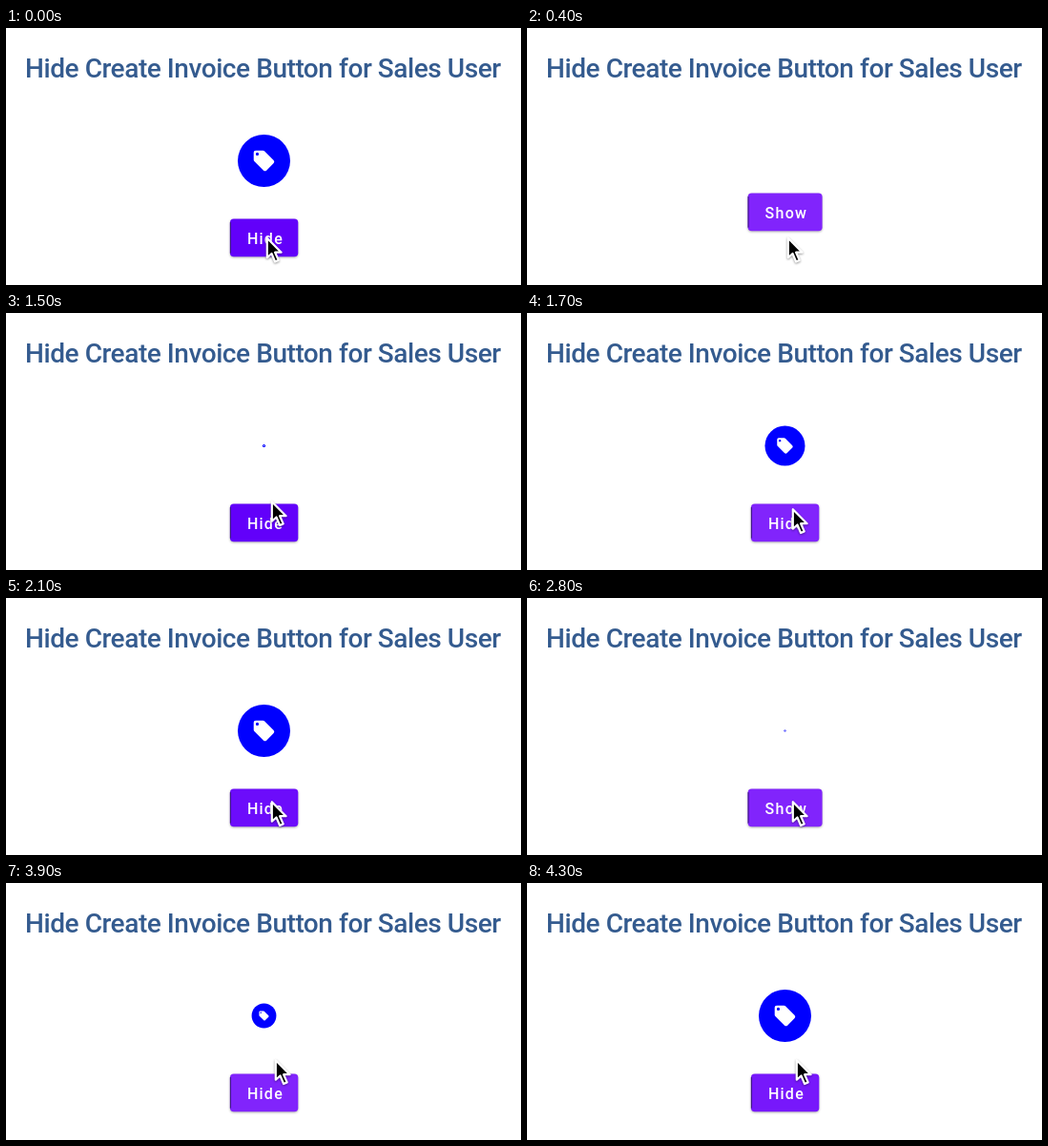
Animation, 540 px wide and 270 px high, one loop 4400 ms. Source, as an HTML page:

```html
<!DOCTYPE html>
<html lang="en">
<head>
<meta charset="utf-8">
<title>Hide and show a button</title>
<style>
  html, body { margin: 0; width: 100%; height: 100%; overflow: hidden; background: #fff; }
  svg { display: block; width: 100vw; height: 100vh; }
  text { font-family: Roboto, "Open Sans", sans-serif; font-weight: 500; }
  .title { font-size: 28px; letter-spacing: -.45px; fill: #345b8f; }
  .label { font-size: 16px; letter-spacing: 1.25px; fill: #fff; }
  #button { filter: drop-shadow(0 1px 1px rgba(0, 0, 0, .3)); }
  #cursor { filter: drop-shadow(0 1px 1px rgba(0, 0, 0, .4)); }
</style>
</head>
<body>
<svg viewBox="0 0 540 270">
  <text class="title" x="20" y="52">Hide Create Invoice Button for Sales User</text>

  <g id="badge">
    <circle r="27.5" fill="#00f"/>
    <path transform="scale(1.08) translate(-12 -12)" fill="#fff" fill-rule="evenodd"
      d="M4 2h7q.8 0 1.4.6l9 9q1.2 1.4 0 2.8l-7 7q-1.4 1.2-2.8 0l-9-9Q2 11.8 2 11V4q0-2 2-2z
         M5.5 4a1.5 1.5 0 1 0 0 3a1.5 1.5 0 1 0 0-3z"/>
  </g>

  <g id="button">
    <rect id="face" height="39.6" rx="4"/>
    <path d="M.5 3.5v32.5" stroke="#38147c" fill="none"/>
    <text id="label" class="label" x="18" y="26.2"></text>
  </g>

  <path id="cursor" d="M0 0V20.5L4.7 16.3L8.3 24.8L11.9 23.2L8.3 15H14.8Z"
    stroke="#fff" stroke-width="2.2" stroke-linejoin="round"/>
</svg>
<script>
  const LOOP = 4400, TICK = 100;
  const CLICKS = [100, 1400, 2600, 3700];
  const MOVES = [
    { from: 600, to: 1200, dx: 5, dy: -22.5 },
    { from: 1500, to: 1900, dx: 0, dy: 16 },
    { from: 2900, to: 3400, dx: 4, dy: -28 },
  ];
  const BASE = [98, 0, 250], LIGHT = [129, 36, 252];

  const $ = id => document.getElementById(id);
  const ramp = (t, from, to) => Math.min(1, Math.max(0, (t - from) / (to - from)));
  const glide = k => k * k * (3 - 2 * k);
  const shrink = age => (1 - ramp(age, 0, 250)) ** 2;
  const grow = age => 1 - (1 - ramp(age, 88, 500)) ** 2;

  const place = (id, x, y, scale = 1) =>
    $(id).setAttribute("transform", `translate(${x} ${y}) scale(${scale})`);

  function drawCursor(t) {
    let x = 273.8, y = 220.7;
    for (const { from, to, dx, dy } of MOVES) {
      const k = glide(ramp(t, from, to));
      x += dx * k;
      y += dy * k;
    }
    place("cursor", x, y);
  }

  function draw(t) {
    const clicks = CLICKS.filter(c => c <= t).length;
    const age = clicks ? t - CLICKS[clicks - 1] : LOOP;
    const hidden = clicks % 2 === 1;
    const width = hidden ? 78 : 71.4;

    place("badge", 270.5, 139.5, hidden ? shrink(age) : grow(age));
    place("button", 270.6 - width / 2, hidden && age >= 300 ? 173.6 : 200.6);
    drawCursor(t);

    // The pressed tint fades in after a click and out again
    const tint = ramp(age, 100, 200) - ramp(age, 500, 800);
    const color = BASE.map((c, i) => Math.round(c + (LIGHT[i] - c) * tint));
    $("face").setAttribute("width", width);
    $("face").setAttribute("fill", `rgb(${color})`);
    $("label").textContent = hidden ? "Show" : "Hide";
  }

  const start = performance.now();
  function frame() {
    const t = (performance.now() - start) % LOOP;
    draw(Math.floor(t / TICK) * TICK);
    requestAnimationFrame(frame);
  }
  frame();
</script>
</body>
</html>
```
